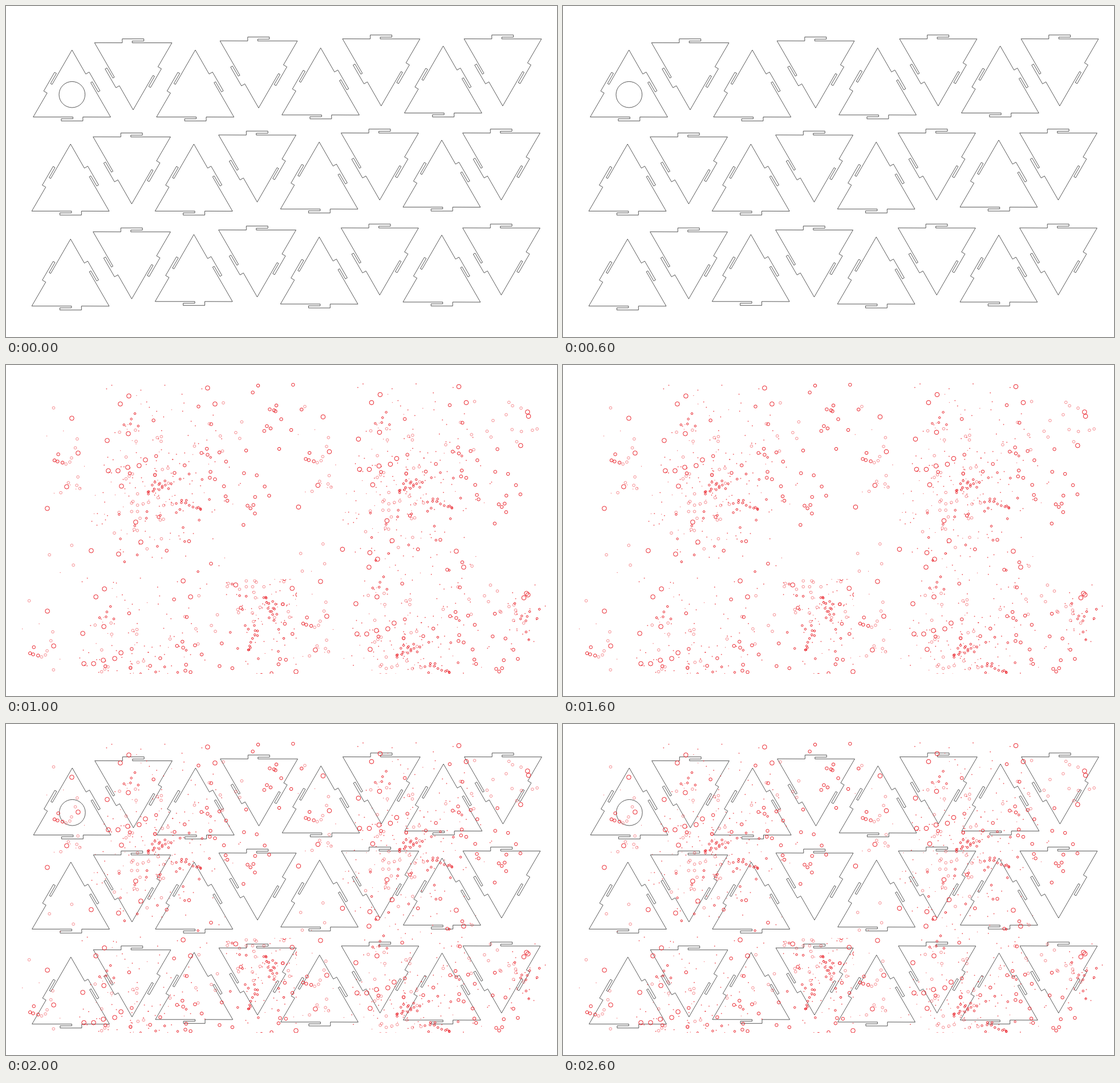
Write an HTML page with a canvas that moves like this. It is 966 px wide and 580 px high and loops after 3 s.

```html
<!DOCTYPE html>
<html lang="en">
<head>
<meta charset="utf-8">
<title>Cut and engrave layers</title>
<style>
  html, body { margin: 0; width: 100%; height: 100%; overflow: hidden; background: #fff; }
  canvas { display: block; }
</style>
</head>
<body>
<canvas id="stage" width="966" height="580"></canvas>
<script>
const ctx = document.getElementById('stage').getContext('2d');
const RED = '#ea1c24';

// One side of a triangular panel around its centroid, with the hooked tab.
const side = [[-67.9, 39.1], [1.75, 39.1], [1.75, 42.2], [-18.7, 42.2], [-18.7, 46], [19.2, 46], [19.2, 39.1]];
const panel = new Path2D();
for (let k = 0; k < 3; k++) {
  const c = Math.cos(k * 2 * Math.PI / 3), s = Math.sin(k * 2 * Math.PI / 3);
  for (const [x, y] of side) panel.lineTo(x * c + y * s, y * c - x * s);
}
panel.closePath();

// Tips of the panels in the first row; odd ones point down.
const tips = [[115.6, 77], [223, 182], [331.8, 77], [443, 178.7], [551.6, 73.4], [657.8, 175.2], [766.4, 70], [870.9, 175.2]];
const rows = [[0, 0], [-2.5, 164.9], [-2.5, 331.3]];

let seed = 11;
const random = () => (seed = seed * 16807 % 2147483647) / 2147483647;
const spread = () => random() + random() - 1;

const BIG = [3.8, 1], MEDIUM = [2.7, 1], SMALL = [1.7, 1], THIN = [2.3, .5], DOT = [.5, .8], SPECK = [.2, .9];

// Bubbles as [x, y, radius, line width], densest in the middle of an ellipse.
const cloud = (count, [r, width], x, y, rx, ry) =>
  Array.from({ length: count }, () => [x + rx * spread(), y + ry * spread(), r, width]);

// Small bubbles along a gentle bow.
const chain = (count, x0, y0, x1, y1, bow) => Array.from({ length: count }, (_, i) => {
  const t = i / (count - 1);
  return [x0 + (x1 - x0) * t, y0 + (y1 - y0) * t + bow * Math.sin(Math.PI * t), ...SMALL];
});

const landmarks = [[115, 93], [126, 154], [106, 213], [72, 251], [149, 325], [177, 132], [179, 185], [196, 185],
  [213, 179], [233, 176], [202, 212], [227, 275], [236, 310], [197, 331], [215, 54], [200, 68], [214, 120],
  [244, 166], [353, 40], [366, 68]];

const tile = [
  ...landmarks.map(([x, y]) => [x + .4, y + .3, ...BIG]),
  ...cloud(24, MEDIUM, 325, 200, 120, 160),
  ...cloud(10, MEDIUM, 430, 235, 65, 85),
  ...cloud(4, MEDIUM, 85, 205, 45, 150),
  ...chain(6, 308, 237, 341, 252, 3),
  ...chain(5, 258, 221, 321, 191, 2),
  ...cloud(12, SMALL, 262, 214, 28, 18),
  ...cloud(24, SMALL, 280, 270, 110, 110),
  ...cloud(5, SMALL, 220, 85, 30, 55),
  ...cloud(14, THIN, 112, 230, 40, 170),
  ...cloud(34, THIN, 230, 235, 75, 160),
  ...cloud(8, THIN, 370, 115, 70, 65),
  ...cloud(120, DOT, 275, 205, 160, 190),
  ...cloud(45, SPECK, 235, 210, 190, 190)
];

// Bubbles outside the repeated tile.
const strays = [
  ...cloud(14, MEDIUM, 475, 85, 55, 70),
  ...cloud(3, BIG, 910, 105, 35, 50),
  ...cloud(9, THIN, 905, 95, 45, 55),
  ...cloud(3, BIG, 915, 403, 35, 5),
  ...cloud(10, SMALL, 905, 445, 45, 60),
  ...cloud(9, THIN, 890, 435, 40, 45),
  ...cloud(20, DOT, 905, 460, 45, 80)
];

const shifts = [[0, 0], [440.5, -2.4], [-42.8, 338], [436, 286]];
const turned = [0, 1, -1, 0, 678, 158];

function ring(x, y, r, width) {
  ctx.lineWidth = width;
  ctx.beginPath();
  ctx.arc(x, y, r, 0, 7);
  ctx.stroke();
}

function drawRings(bubbles, matrix = [1, 0, 0, 1, 0, 0]) {
  ctx.save();
  ctx.transform(...matrix);
  for (const bubble of bubbles) ring(...bubble);
  ctx.restore();
}

function clip(x, y, w, h) {
  ctx.beginPath();
  ctx.rect(x, y, w, h);
  ctx.clip();
}

function drawBubbles() {
  ctx.save();
  ctx.strokeStyle = RED;
  clip(21.5, 29.5, 927, 511.5);
  for (const shift of shifts) drawRings(tile, [1, 0, 0, 1, ...shift]);
  drawRings(strays);
  clip(385, 375.5, 125, 166);
  drawRings(tile, turned);
  ctx.restore();
}

function drawPanels(shift) {
  ctx.save();
  ctx.translate(shift, 0);
  ctx.strokeStyle = '#111';
  ring(115.8, 155.2, 22.8, .7);
  rows.forEach(([dx, dy], row) => tips.forEach(([x, y], i) => {
    const dir = i % 2 ? -1 : 1;
    const lift = row === 2 && i === 2 ? -8 : 0;
    ctx.save();
    ctx.translate(x + dx, y + dy + lift + dir * 78.4);
    ctx.scale(dir, dir);
    ctx.stroke(panel);
    ctx.restore();
  }));
  ctx.restore();
}

const start = performance.now();
let shown = -1;
function tick() {
  const phase = Math.floor((performance.now() - start) / 1000) % 3;
  if (phase !== shown) {
    shown = phase;
    ctx.fillStyle = '#fff';
    ctx.fillRect(0, 0, 966, 580);
    if (phase !== 1) drawPanels(phase ? .5 : 0);
    if (phase !== 0) drawBubbles();
  }
  requestAnimationFrame(tick);
}
tick();
</script>
</body>
</html>
```
